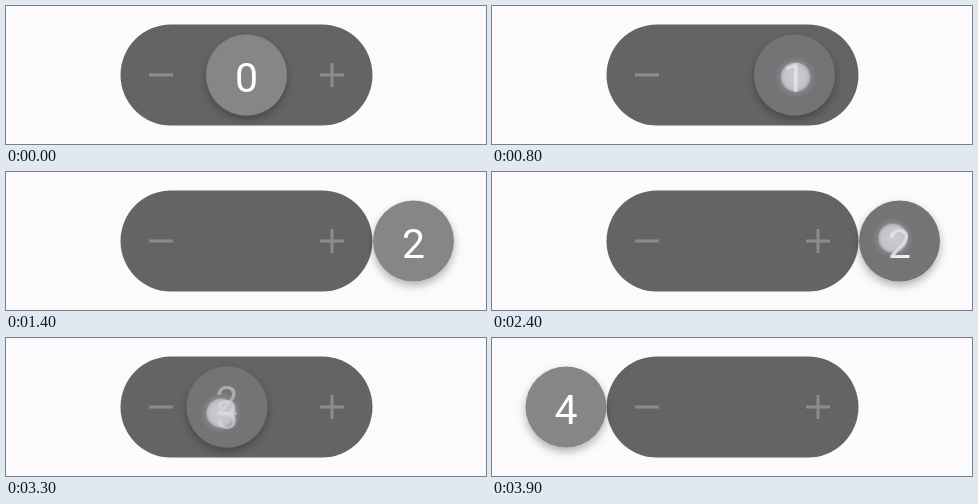
These frames come from a looping animation (480 px wide and 138 px high, 4150 ms). An HTML page:

```html
<!DOCTYPE html>
<html lang="en">
<head>
<meta charset="utf-8">
<title>Counter button</title>
<style>
  html, body { margin: 0; width: 100%; height: 100%; overflow: hidden; background: #fcfafd; }
  svg { display: block; width: 100%; height: 100%; }
  .icon { fill: none; stroke: #8d8b8e; stroke-width: 3; }
  text { font: 400 41px Roboto, sans-serif; fill: #fff; text-anchor: middle; }
</style>
</head>
<body>
<svg viewBox="0 0 480 138">
  <defs>
    <filter id="shadow" x="-30%" y="-30%" width="160%" height="160%">
      <feDropShadow dx="0" dy="4" stdDeviation="4" flood-color="#000" flood-opacity=".3"/>
    </filter>
    <radialGradient id="glow">
      <stop offset="0" stop-color="#e2e0e5" stop-opacity=".82"/>
      <stop offset=".55" stop-color="#d8d6dc" stop-opacity=".8"/>
      <stop offset=".66" stop-color="#d0cdd6" stop-opacity=".7"/>
      <stop offset=".74" stop-color="#a5a2ac" stop-opacity=".3"/>
      <stop offset="1" stop-color="#a5a2ac" stop-opacity="0"/>
    </radialGradient>
  </defs>
  <rect x="114.5" y="18.5" width="252" height="101" rx="50.5" fill="#656366"/>
  <path class="icon" d="M143 69H167M314 69H338M326 57V81"/>
  <g id="knob">
    <circle id="disc" cy="69" r="40.5" filter="url(#shadow)"/>
    <text id="leaving"></text>
    <text id="label"></text>
  </g>
  <circle id="touch" r="21" fill="url(#glow)"/>
</svg>
<script>
  const LOOP = 4150, STEP = 50, BASELINE = 85.5;
  const get = id => document.getElementById(id);
  const knob = get('knob'), disc = get('disc'), touch = get('touch');
  const leaving = get('leaving'), label = get('label');

  const linear = p => p;
  const easeIn = p => p * p;
  const easeOut = p => 1 - (1 - p) ** 3;
  const smooth = p => p * p * (3 - 2 * p);

  // Keys are [time, value, easing into this key].
  const knobX = [[100, 240.5], [400, 302.5, easeOut], [800, 302.5], [1300, 407.5, smooth],
    [2400, 407.5], [2650, 267.5, smooth], [2850, 266, easeOut], [3100, 266],
    [3300, 221, easeIn], [3600, 90.5], [3900, 74, easeOut]];
  const touchDx = [[100, -3], [400, 1], [800, 1], [1300, -8], [2400, -6.5], [2650, -4],
    [3100, -4], [3300, -6], [3900, -6]];
  const touchY = [[800, 71], [1300, 67], [2650, 66], [3100, 68], [3300, 75], [3900, 75]];
  const press = [[50, 0], [100, 1], [1100, 1], [1300, 0], [2350, 0], [2400, 1], [3700, 1], [3850, 0]];
  const changes = [200, 1050, 3180, 3480];
  const CHANGE_TIME = 200;

  function sample(keys, t) {
    if (t <= keys[0][0]) return keys[0][1];
    for (let i = 1; i < keys.length; i++) {
      const [t0, a] = keys[i - 1], [t1, b, ease = linear] = keys[i];
      if (t < t1) return a + (b - a) * ease((t - t0) / (t1 - t0));
    }
    return keys[keys.length - 1][1];
  }

  function setDigit(el, digit, dy, opacity) {
    el.textContent = digit;
    el.setAttribute('y', BASELINE + dy);
    el.setAttribute('opacity', opacity);
  }

  function draw(t) {
    const x = sample(knobX, t), down = sample(press, t);
    knob.setAttribute('transform', `translate(${x} 0)`);
    const mix = (a, b) => Math.round(a + (b - a) * down);
    disc.setAttribute('fill', `rgb(${mix(135, 117)},${mix(133, 115)},${mix(135, 117)})`);

    const count = changes.filter(c => t >= c).length;
    const p = count ? Math.min(1, (t - changes[count - 1]) / CHANGE_TIME) : 1;
    setDigit(label, count, 14 * (1 - p), p * (1 - 0.1 * down));
    setDigit(leaving, Math.max(0, count - 1), -14 * p, 1 - p);

    const touching = (t >= 100 && t < 1400) || (t >= 2400 && t < 3900);
    touch.setAttribute('visibility', touching ? 'visible' : 'hidden');
    touch.setAttribute('cx', x + sample(touchDx, t));
    touch.setAttribute('cy', sample(touchY, t));
  }

  const start = performance.now();
  function tick() {
    const t = (performance.now() - start) % LOOP;
    draw(Math.floor(t / STEP) * STEP);
    requestAnimationFrame(tick);
  }
  tick();
</script>
</body>
</html>
```
